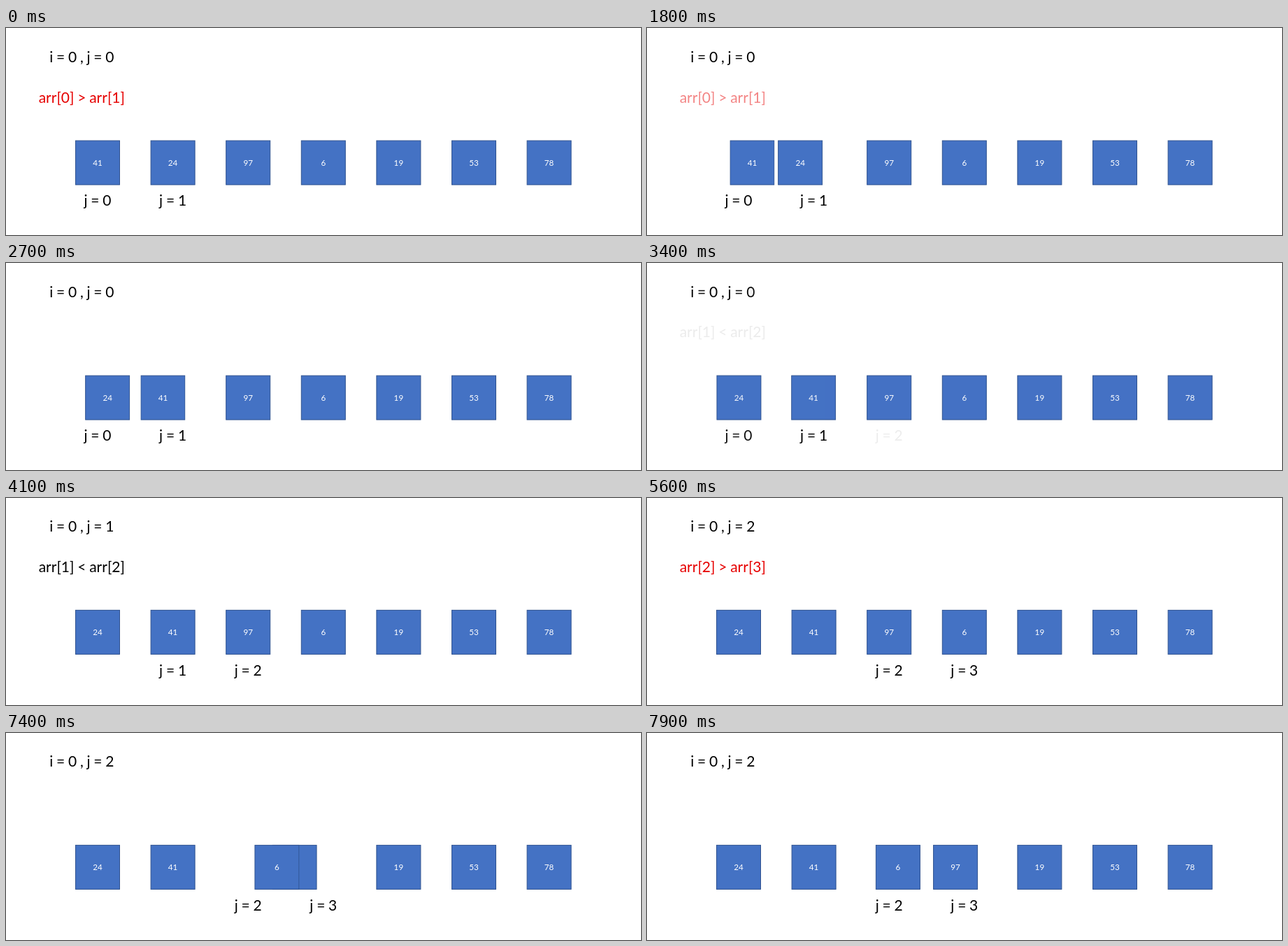
Write an HTML page that moves like this. It is 908 px wide and 296 px high and loops after 8000 ms.

```html
<!DOCTYPE html>
<html lang="en">
<head>
<meta charset="utf-8">
<title>Bubble sort</title>
<style>
  html, body { margin: 0; width: 100%; height: 100%; overflow: hidden; background: #fff; }
  svg { display: block; width: 908px; height: 296px; }
  text { font: 21px Lato, sans-serif; word-spacing: -.6px; text-anchor: middle; }
  .box rect { fill: #4472c4; stroke: #2f528f; }
  .box text { font-size: 11.7px; fill: #fff; }
  .greater { fill: #e60000; }

  .slide, .left, .right, .greater { animation: 0s linear both paused; }
  .slide { animation-name: appear; animation-duration: .7s; }
  #s0 { animation: none; }
  #s1 { animation-delay: 3.35s; }
  #s2 { animation-delay: 5s; animation-duration: .6s; }

  .left, .right { animation-duration: 2.1s; animation-timing-function: ease; animation-delay: var(--swap); }
  .left { animation-name: go-right; }
  .right { animation-name: go-left; }
  .greater { animation-name: vanish; animation-duration: .6s; animation-delay: var(--swap); }
  #s0 { --swap: 1.49s; }
  #s2 { --swap: 6.65s; }

  @keyframes appear { from { opacity: 0; } }
  @keyframes vanish { to { opacity: 0; } }
  @keyframes go-right { to { transform: translateX(107.6px); } }
  @keyframes go-left { to { transform: translateX(-107.6px); } }
</style>
</head>
<body>
<svg id="stage" viewBox="0 0 908 296"></svg>
<script>
const LOOP = 8000, STEP = 100;
const centre = k => 131 + 107.6 * k;

function add(parent, tag, attrs, text = '') {
  const el = document.createElementNS('http://www.w3.org/2000/svg', tag);
  for (const name in attrs) el.setAttribute(name, attrs[name]);
  el.textContent = text;
  return parent.appendChild(el);
}

// Each slide is opaque, so fading one in gives a true crossfade.
function addSlide(j, values, dy) {
  const slide = add(stage, 'g', { id: 's' + j, class: 'slide' });
  add(slide, 'rect', { width: 908, height: 296, fill: '#fff' });
  const body = add(slide, 'g', { transform: `translate(0 ${dy})` });
  const swaps = values[j] > values[j + 1];

  add(body, 'text', { x: 108.3, y: 49 }, `i = 0 , j = ${j}`);
  add(body, 'text', { x: 108.3, y: 106.6, class: swaps ? 'greater' : 'less' },
    `arr[${j}] ${swaps ? '>' : '<'} arr[${j + 1}]`);
  for (const k of [j, j + 1]) add(body, 'text', { x: centre(k), y: 254.4 }, `j = ${k}`);

  values.forEach((value, k) => {
    const role = !swaps ? '' : k === j ? ' left' : k === j + 1 ? ' right' : '';
    const box = add(body, 'g', { class: 'box' + role });
    add(box, 'rect', { x: centre(k) - 31.5, y: 161.1, width: 63, height: 63 });
    add(box, 'text', { x: centre(k), y: 196.5 }, value);
  });
}

const stage = document.getElementById('stage');
const sorted = [24, 41, 97, 6, 19, 53, 78];
addSlide(0, [41, 24, ...sorted.slice(2)], 0);
addSlide(1, sorted, -0.7);
addSlide(2, sorted, -0.7);

// Drive the keyframes at ten pictures per second.
const animations = document.getAnimations();
const start = performance.now();
function tick() {
  const t = Math.floor((performance.now() - start) % LOOP / STEP) * STEP;
  for (const a of animations) a.currentTime = t;
  requestAnimationFrame(tick);
}
tick();
</script>
</body>
</html>
```
